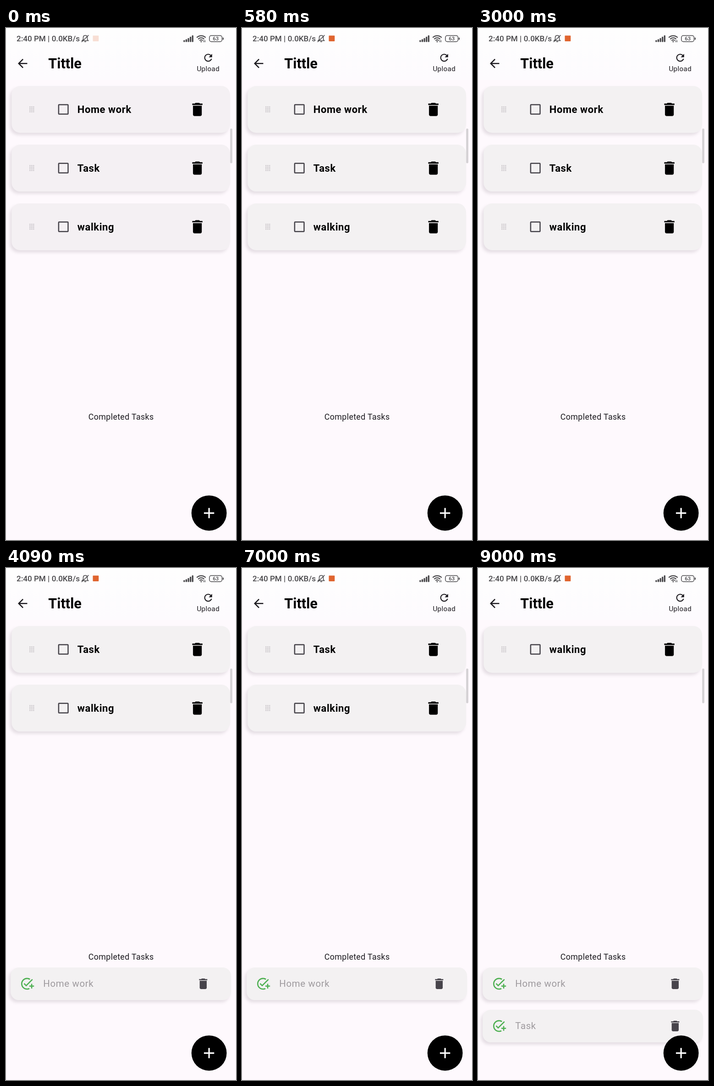
An HTML page for the animation above (9.61 s loop, 502 px wide and 1115 px high).

```html
<!DOCTYPE html>
<html lang="en">
<head>
<meta charset="utf-8">
<title>Task list</title>
<style>
  html, body { margin: 0; width: 100%; height: 100%; overflow: hidden; background: #fef9fd; }
  svg { display: block; width: 100%; height: 100%; }
  text { font-family: Roboto, sans-serif; fill: #1d1b20; }
  .card { fill: var(--card); filter: drop-shadow(-4px 5px 3px rgba(60, 40, 60, .12)); }
  .task { font-size: 22px; font-weight: 700; letter-spacing: .58px; fill: #000; }
  .done { font-size: 20.45px; letter-spacing: .64px; fill: #9e9a9e; }
</style>
</head>
<body>
<svg id="stage" viewBox="0 0 502 1115">
  <defs>
    <path id="trash" d="M6 19c0 1.1.9 2 2 2h8c1.1 0 2-.9 2-2V7H6v12zM19 4h-3.5l-1-1h-5l-1 1H5v2h14V4z"/>
    <path id="back" d="M20 11H7.83l5.59-5.59L12 4l-8 8 8 8 1.41-1.41L7.83 13H20v-2z"/>
    <path id="refresh" d="M17.65 6.35C16.2 4.9 14.21 4 12 4c-4.42 0-7.99 3.58-7.99 8s3.57 8 7.99 8c3.73 0 6.84-2.55 7.73-6h-2.08c-.82 2.33-3.04 4-5.65 4-3.31 0-6-2.69-6-6s2.69-6 6-6c1.66 0 3.14.69 4.22 1.78L13 11h7V4l-2.35 2.35z"/>
    <path id="check" d="M22 5.18L10.59 16.6l-4.24-4.24 1.41-1.41 2.83 2.83 10-10zM12 20c-4.41 0-8-3.59-8-8s3.59-8 8-8c1.57 0 3.04.46 4.28 1.25l1.45-1.45C16.1 2.67 14.13 2 12 2 6.48 2 2 6.48 2 12s4.48 10 10 10c1.73 0 3.36-.44 4.78-1.22l-1.5-1.5C14.28 19.74 13.17 20 12 20zM19 15h-3v2h3v3h2v-3h3v-2h-3v-3h-2z"/>
    <path id="plus" d="M19 13h-6v6h-2v-6H5v-2h6V5h2v6h6z"/>
    <linearGradient id="bar" x2="0" y2="1">
      <stop stop-color="#fefefe"/><stop offset="1" stop-color="#fdfbfe"/>
    </linearGradient>
  </defs>

  <rect width="502" height="113" fill="url(#bar)"/>

  <!-- status bar -->
  <text x="23" y="29.3" font-size="17.1" font-weight="500" style="fill:#48474a">2:40 PM | 0.0KB/s</text>
  <g fill="none" stroke="#48474a" stroke-width="1.5">
    <path d="M166 27.5h13.5l-2-2.5v-4c0-3-1.8-4.7-4.5-4.7s-4.5 1.7-4.5 4.7v4zM171 29.8h4M180.5 15.5l-15.5 15"/>
    <rect x="444" y="16.5" width="27.5" height="13.2" rx="4"/>
    <path d="M474 21v4.5" stroke-width="2"/>
  </g>
  <rect id="recorder" x="189.5" y="16.5" width="12.8" height="12.6" rx="1" fill="#e0642f"/>
  <g id="signal" fill="#48474a"></g>
  <g fill="none" stroke="#48474a" stroke-width="2.3">
    <path d="M416.3 20.8a14 14 0 0 1 19.4 0M419.4 24.2a9.3 9.3 0 0 1 13.2 0M422.5 27.4a5 5 0 0 1 7 0"/>
    <path d="M424.3 29.4h3.4l-1.7 1.7z" fill="#48474a" stroke-width="1"/>
    <path d="M431.6 31v-4.5M434.4 26.5V31" stroke-width="1.2"/>
  </g>
  <text x="457.8" y="27.3" font-size="11.5" font-weight="500" text-anchor="middle" style="fill:#48474a">63</text>

  <!-- app bar -->
  <text x="92.3" y="87.8" font-size="30.7" font-weight="700" style="fill:#000">Tittle</text>
  <text x="441.3" y="94.4" font-size="15.3" letter-spacing=".32" text-anchor="middle">Upload</text>

  <text x="251.2" y="853" font-size="17.9" letter-spacing=".32" text-anchor="middle">Completed Tasks</text>
  <g id="list"></g>
  <rect x="489.2" y="219" width="4.8" height="75.5" rx="2" fill="#d5d2d5"/>
  <circle cx="443.2" cy="1056.3" r="38.4"/>
  <g id="icons"></g>
</svg>
<script>
const LOOP = 9610;
const TASKS = ["Home work", "Task", "walking"];
const CHECK_TIMES = [4090, 7090];
const $ = id => document.getElementById(id);

const icon = (name, cx, cy, size, color) =>
  `<use href="#${name}" fill="${color}" transform="translate(${cx - size / 2} ${cy - size / 2}) scale(${size / 24})"/>`;

function dragHandle(cy) {
  let dots = "";
  for (let i = 0; i < 12; i++) {
    const x = 51 + (i % 3) * 3.9, y = cy - 6.6 + Math.floor(i / 3) * 3.5;
    dots += `<rect x="${x}" y="${y}" width="2.7" height="2.4" fill="#d0ccd0"/>`;
  }
  return dots;
}

function openTask(name, i) {
  const cy = 177.3 + i * 127.8;
  return `<rect class="card" x="12.3" y="${cy - 51}" width="476.8" height="102" rx="19"/>` +
    dragHandle(cy) +
    `<rect x="114.9" y="${cy - 10.3}" width="20.6" height="20.6" rx="1" fill="none" stroke="#47444b" stroke-width="2.5"/>` +
    `<text class="task" x="155.8" y="${cy + 7.7}">${name}</text>` +
    icon("trash", 417.7, cy, 38.3, "#000");
}

function doneTask(name, i) {
  const cy = 905.4 + i * 92;
  return `<rect class="card" x="10.2" y="${cy - 35.4}" width="481" height="71" rx="18"/>` +
    icon("check", 45.8, cy, 30.7, "#4caf50") +
    `<text class="done" x="81.2" y="${cy + 6.6}">${name}</text>` +
    icon("trash", 430.4, cy, 30.7, "#47444b");
}

$("signal").innerHTML = [4, 6, 8.5, 11.5, 14.5].map((h, i) =>
  `<rect x="${387.3 + i * 4.6}" y="${30.5 - h}" width="3.3" height="${h}" rx="1"/>`).join("");
$("icons").innerHTML = icon("back", 36.2, 77.3, 30.7, "#1d1b20") +
  icon("refresh", 441.3, 64.8, 25.8, "#1d1b20") +
  icon("plus", 443.2, 1056.3, 38.3, "#fff");

let shown = -1;
function frame() {
  const t = performance.now() % LOOP;
  const done = CHECK_TIMES.filter(time => t >= time).length;
  if (done !== shown) {
    shown = done;
    $("list").innerHTML = TASKS.slice(done).map(openTask).join("") +
      TASKS.slice(0, done).map(doneTask).join("");
  }
  const fade = Math.min(1, Math.max(0, (t - 30) / 450));
  $("recorder").setAttribute("opacity", 0.2 + 0.8 * fade);
  $("stage").style.setProperty("--card", `rgb(${244 - fade}, ${240 + fade}, ${243 - fade})`);
  requestAnimationFrame(frame);
}
frame();
</script>
</body>
</html>
```
